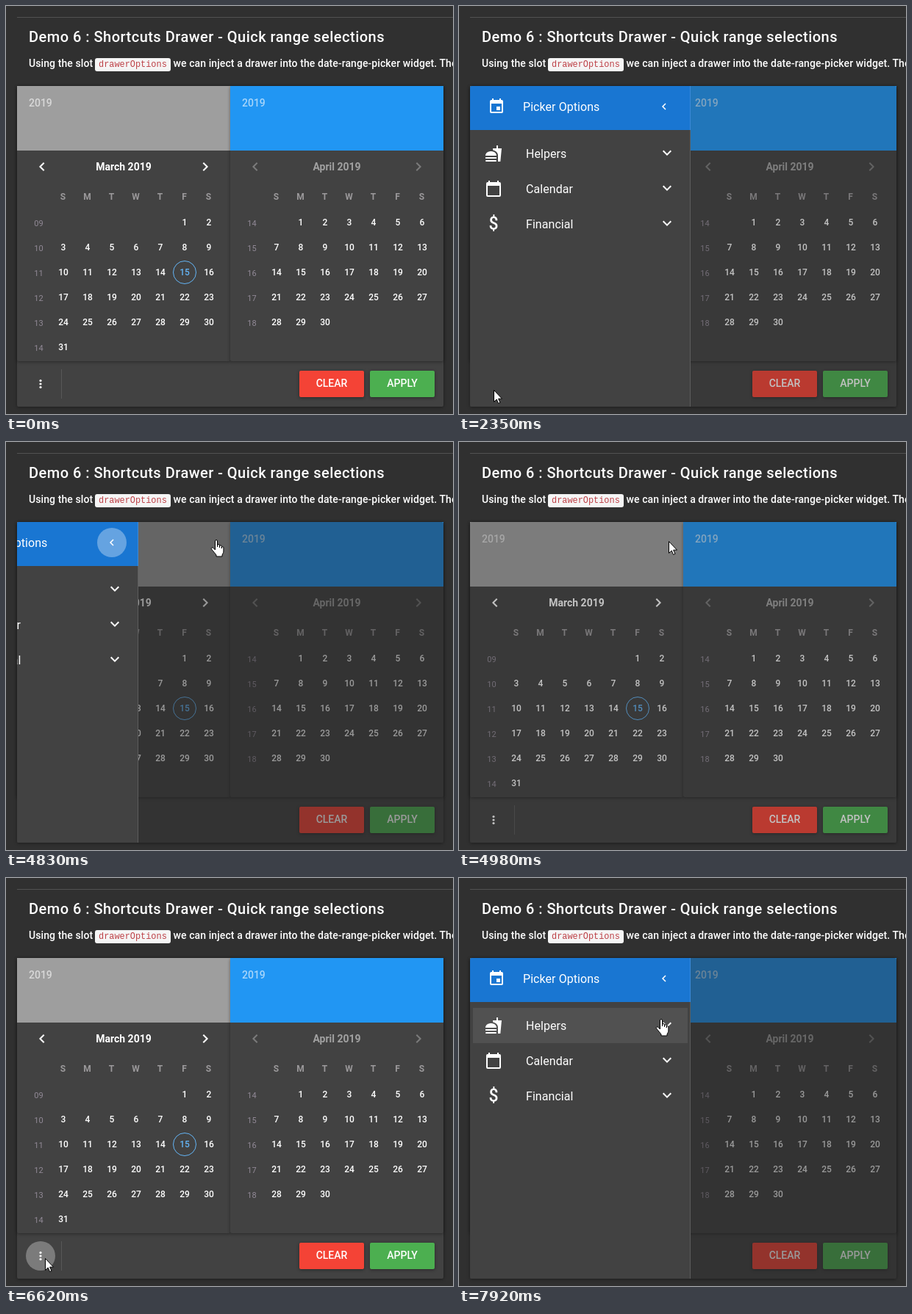
Write an HTML page that moves like this. It is 608 px wide and 556 px high and loops after 8000 ms.

```html
<!DOCTYPE html>
<html lang="en">
<head>
<meta charset="utf-8">
<title>Date range picker drawer</title>
<style>
  html, body { margin: 0; width: 100%; height: 100%; overflow: hidden; background: #303030; }
  svg { display: block; width: 608px; height: 556px; font: 500 14px Roboto, sans-serif; fill: #fff; }
  .mid { text-anchor: middle; }
  .title { font-size: 20px; letter-spacing: .024em; }
  .body { letter-spacing: .006em; }
  .code { font: 11.9px "Liberation Mono", monospace; fill: #bd4147; }
  .month { font-weight: 700; }
  .head { font-size: 12px; font-weight: 700; fill: #9b999b; }
  .day { font-size: 12px; }
  .week { font-size: 11px; font-weight: 400; fill: #928a97; }
  .item { font-size: 16px; font-weight: 400; letter-spacing: .004em; }
  .coin { font-size: 23px; }
  .card { filter: drop-shadow(0 1px 2px rgba(0, 0, 0, .4)); }
  .line { fill: none; stroke: #fff; stroke-width: 2; }
</style>
</head>
<body>
<svg id="stage" viewBox="0 0 608 556"></svg>
<script>
// Markup helpers
const text = (x, y, s, cls = '', extra = '') => `<text x="${x}" y="${y}" class="${cls}" ${extra}>${s}</text>`;
const rect = (x, y, w, h, fill, extra = '') =>
  `<rect x="${x}" y="${y}" width="${w}" height="${h}" fill="${fill}" ${extra}/>`;
const card = (x, y, w, h, fill) => `<g class="card">${rect(x, y, w, h, fill, 'rx="2"')}</g>`;
const at = (x, y, body) => `<g transform="translate(${x} ${y})">${body}</g>`;
const halo = (id, cx, cy) => `<circle id="${id}" cx="${cx}" cy="${cy}" r="20" opacity="0"/>`;

// Icons, each drawn around its own centre
const chevron = (x, y, angle, scale = 1, extra = '') => at(x, y,
  `<path class="line" transform="rotate(${angle}) scale(${scale})" d="M2.7 -5.3L-2.6 0L2.7 5.3" ${extra}/>`);
const sheet = half =>
  `<rect class="line" x="${1 - half}" y="-8" width="${2 * half - 2}" height="${2 * half - 2}" rx="1"/>` +
  rect(1 - half, -8, 2 * half - 2, 4, '#fff') +
  [-1, 1].map(side => rect(side * (half - 4) - 1, -11, 2, 3, '#fff')).join('');
const eventSheet = sheet(9) + rect(0, 0, 5, 5, '#fff');
const meal =
  '<path d="M6 11h3.3L11 -7h-5v-4h-2v4h-5l.3 2.4c5 1.5 6.7 4 6.7 7.6zM-11 3C-11 -5 4 -5 4 3z"/>' +
  rect(-11, 5, 15, 2, '#fff') + rect(-11, 9, 15, 2, '#fff', 'rx="1"');
const coin = text(0, 8, '$', 'mid coin');

function month(x, color, name, first, days, week, active) {
  const dim = active ? '' : 'opacity=".3"';
  let out = card(x, 109, 290, 375, '#424242');
  out += rect(x, 109, 290, 88, color) + text(x + 16, 137, '2019', '', 'opacity=".6"');
  out += chevron(x + 34, 219, 0, 1, dim) + chevron(x + 256, 219, 180, 1, dim);
  out += text(x + 145, 224, name + ' 2019', 'mid month', active ? '' : 'opacity=".5"');
  [...'SMTWTFS'].forEach((d, i) => out += text(x + 62.5 + 33 * i, 264, d, 'mid head'));
  for (let r = 0; r * 7 < first + days; r++)
    out += text(x + 29.5, 300 + 34 * r, String(week + r).padStart(2, '0'), 'mid week');
  for (let d = 1; d <= days; d++) {
    const slot = first + d - 1, cx = x + 63 + 33 * (slot % 7), cy = 295 + 34 * Math.floor(slot / 7);
    const today = active && d === 15;
    if (today) out += `<circle cx="${cx}" cy="${cy}" r="15.5" fill="none" stroke="#64b5f6"/>`;
    out += text(cx, cy + 4, d, 'mid day', today ? 'fill="#64b5f6"' : '');
  }
  return out;
}

const button = (x, color, label) => card(x, 497, 88, 36, color) + text(x + 44, 519, label, 'mid');
const row = (y, glyph, label) => at(47, y, glyph) + text(91, y + 6, label, 'item') + chevron(283, y - 1, -90);

const page =
  rect(15, 15, 593, 1, '#525252') +
  text(31, 49, 'Demo 6 : Shortcuts Drawer - Quick range selections', 'title') +
  text(31, 83, 'Using the slot', 'body') +
  rect(121, 71, 103, 18, '#f5f5f5', 'rx="3"') + text(126, 83, 'drawerOptions', 'code') +
  text(227.5, 83, 'we can inject a drawer into the date-range-picker widget. The', 'body');

const picker =
  card(15, 109, 580, 437, '#424242') +
  month(15, '#9e9e9e', 'March', 5, 31, 9, true) +
  month(305, '#2196f3', 'April', 1, 30, 14, false) +
  rect(75, 495, 1, 40, '#585858') + halo('dotsHalo', 47, 515) +
  [-1, 0, 1].map(i => `<circle cx="47" cy="${515 + 4.5 * i}" r="1.6"/>`).join('') +
  button(399, '#f44336', 'CLEAR') + button(495, '#4caf50', 'APPLY');

const drawer =
  rect(15, 109, 300, 437, '#424242') + rect(15, 109, 300, 60, '#1976d2') +
  rect(314, 109, 1, 437, '#fff', 'opacity=".14"') +
  at(51, 137, eventSheet) + text(87, 143, 'Picker Options', 'item') +
  halo('backHalo', 279, 137) + chevron(279, 137, 0, .75) +
  rect(19, 177, 292, 48, '#fff', 'id="hover" opacity="0"') +
  row(201, meal, 'Helpers') + row(249, sheet(10), 'Calendar') + row(297, coin, 'Financial');

document.getElementById('stage').innerHTML = `
  <clipPath id="frame"><rect x="15" y="109" width="580" height="437" rx="2"/></clipPath>
  ${page}${picker}
  <g clip-path="url(#frame)">
    ${rect(15, 109, 580, 437, '#212121', 'id="veil" opacity="0"')}
    <g id="drawer">${drawer}</g>
  </g>
  <g id="pointer" stroke="#000" stroke-linejoin="round">
    <path id="arrow" d="M.5 .5V16.5L4.2 13L6.6 18.5L9 17.4L6.6 12.2H11.5Z"/>
    <path id="hand" transform="translate(-8.5 -1)" d="M6 2a1.5 1.5 0 0 1 3 0V10V8a1.5 1.5 0 0 1 3 0V11V9.2a1.4 1.4 0 0 1 2.8 0V12V11a1.3 1.3 0 0 1 2.6 0V16C17.4 18 16 19.5 15.5 21V23H7.5V21C6 19 3.5 16 1 13C0 11.5 2 10 3.5 11.5L6 14Z"/>
  </g>`;

const LOOP = 8000, STEP = 77.5;
const OPEN = 2090, CLOSE = 4764, REOPEN = 6610;

// The picture advances in even steps, lined up with the moment the drawer starts to close
const snap = t => 4830 + STEP * Math.floor((t - 4830) / STEP + .2);
const ramp = (t, from, to) => Math.min(1, Math.max(0, (t - from) / (to - from)));
const within = (t, a, b) => t >= a && t < b;

// Cubic bezier (.4, 0, .2, 1)
function ease(p) {
  let lo = 0, hi = 1;
  for (let i = 0; i < 24; i++) {
    const u = (lo + hi) / 2, v = 1 - u;
    if (1.2 * v * v * u + .6 * v * u * u + u * u * u < p) lo = u; else hi = u;
  }
  return lo * lo * (3 - 2 * lo);
}

function swing(t, delay, length) {
  const part = start => ease(ramp(t, start + delay, start + delay + length));
  return part(OPEN) - part(CLOSE) + part(REOPEN);
}

const TRIPS = [
  { from: 1110, to: 1340, x: 34, y: 513 },
  { from: 1580, to: 1650, x: 47, y: 516 },
  { from: 2110, to: 2190, x: 47, y: 523 },
  { from: 2750, to: 3600, x: 286.5, y: 134 },
  { from: 4980, to: 5530, x: 151, y: 295 },
  { from: 5530, to: 5990, x: 53, y: 518 },
  { from: 7310, to: 7920, x: 275.5, y: 193 }
];

function pointerAt(t) {
  const start = t < 1000 ? { x: 15, y: 544 } : { x: 47, y: 527 };
  return TRIPS.reduce((p, trip) => {
    const k = ramp(t, trip.from, trip.to);
    return { x: p.x + (trip.x - p.x) * k, y: p.y + (trip.y - p.y) * k };
  }, start);
}

const el = id => document.getElementById(id);
const fade = (id, v) => el(id).setAttribute('opacity', v);
const move = (id, x, y) => el(id).setAttribute('transform', `translate(${Math.round(x)} ${Math.round(y)})`);

function draw(time) {
  const t = snap(time);
  const shift = Math.round(300 * swing(t, 0, 200));
  move('drawer', shift - 300, 0);
  fade('drawer', shift > 1 ? 1 : 0);
  fade('veil', .46 * swing(t, 65, 500));

  const press = t < OPEN + 250 ? ramp(t, 1730, 1880) : t < REOPEN + 250 ? ramp(t, 6320, 6550) : 0;
  fade('dotsHalo', .3 * press);
  fade('backHalo', t < CLOSE + 400 ? .12 * ramp(t, 3440, 3600) + .21 * ramp(t, 4380, 4680) : 0);
  fade('hover', .08 * ramp(t, 7760, 7920));

  const { x, y } = pointerAt(t), hand = within(t, 3500, 4980) || t >= 7700;
  move('pointer', x, y);
  fade('pointer', within(t, 480, 560) || t >= 1110 ? 1 : 0);
  fade('arrow', hand ? 0 : 1);
  fade('hand', hand ? 1 : 0);
}

const begin = performance.now();
function tick() {
  draw((performance.now() - begin) % LOOP);
  requestAnimationFrame(tick);
}
tick();
</script>
</body>
</html>
```
